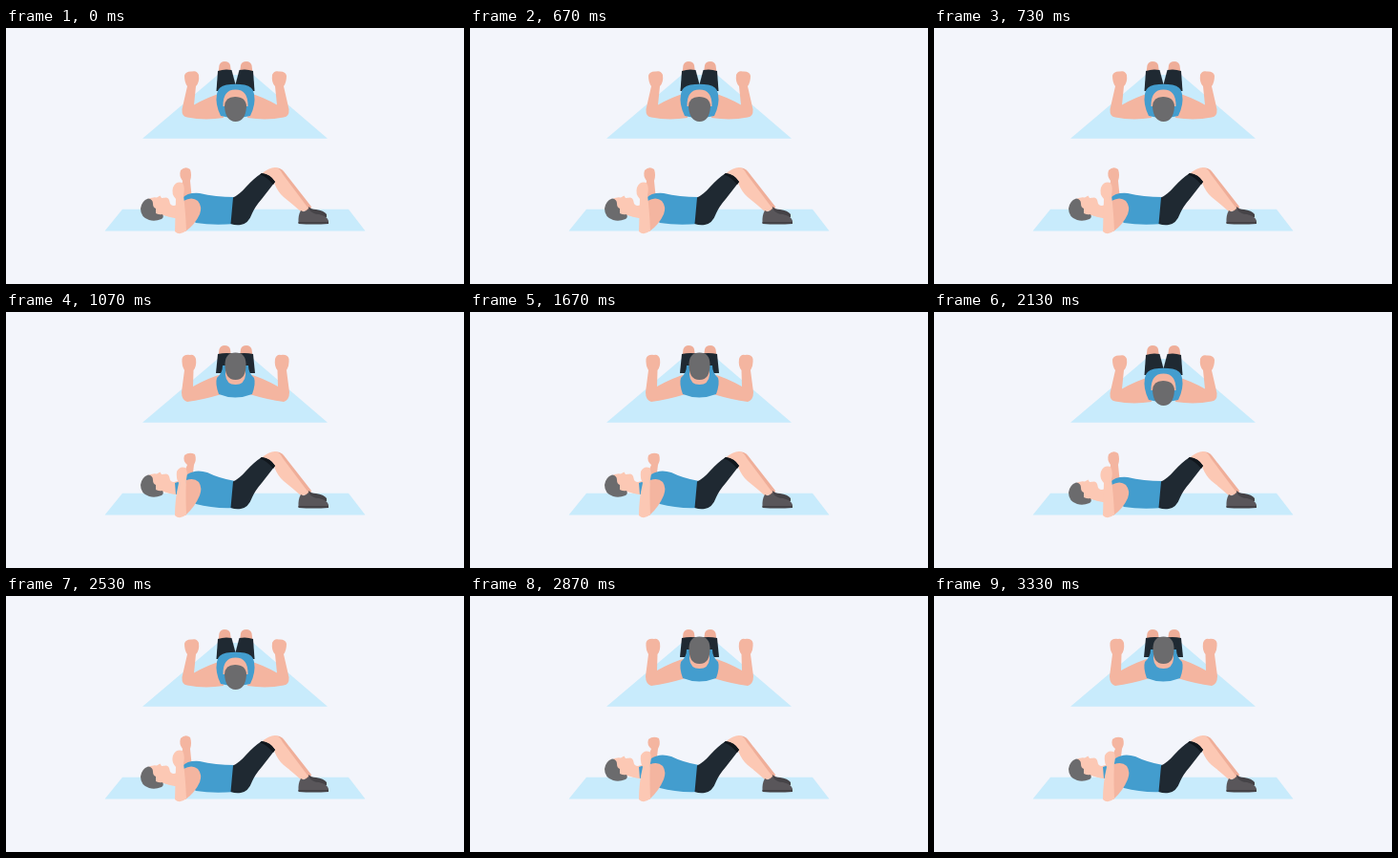
Animation of 480 by 268 pixels, one loop 3.39 s. Source, as an HTML page:

```html
<!DOCTYPE html>
<html lang="en">
<head>
<meta charset="utf-8">
<title>Floor exercise</title>
<style>
  html, body { margin: 0; width: 100%; height: 100%; overflow: hidden; background: #f3f5fb; }
  svg { display: block; width: 100%; height: 100%; }
  .mat { fill: #c8ebfc; }
  .skin { fill: #f4b5a0; }
  .light { fill: #fcc8b4; }
  .shade { fill: #efae99; }
  .top { fill: #439dce; }
  .shorts { fill: #1f2932; }
  .fold { fill: #11171d; }
  .hair { fill: #6b6b6d; }
  .shoe { fill: #59565a; }
  .sole { fill: #454347; }
</style>
</head>
<body>
<svg viewBox="0 0 480 268" preserveAspectRatio="none">
  <path class="mat" d="M143 115.7 L222 49 H259 L337 115.7 Z"/>
  <path class="mat" d="M122 189.7 H359 L376.500 212.500 H103.500 Z"/>

  <!-- knees, seen from the front -->
  <path id="knee" class="shade" d="M222.500 47 L223.500 39 Q225 35 229 35 Q234 35 235 39 L236 47 Z"/>
  <use href="#knee" transform="translate(481) scale(-1 1)"/>

  <!-- lower legs, seen from the side -->
  <path class="shade" d="M276 150 Q285 143 291 150 L320 187 L318 193 L309 190 Z"/>
  <path class="sole" d="M317 187 Q320 190 325 190 Q333 191 336 195 L336 198 H318 Z"/>
  <path class="light" d="M267 153 Q277 145 283 146 Q287 147 290 153 L317 189 L310 193 Q301 185 291 177 Q285 172 281 162 Z"/>
  <path class="shoe" d="M309 191 Q313 194 317 189 Q321 195 328 195 Q337 197 338 202 V204 H306.500 Q306 196 309 191 Z"/>
  <path class="sole" d="M306.500 203 H338 V205 Q322 206 306.500 205 Z"/>

  <g id="head">
    <path class="light" d="M147 180 Q153 176.500 158 177.500 L161.500 175.500 L163 178 L168 177.500 Q171 178 171.500 182 Q172 186 176 186 L187 183 L190 200 Q176 200 165 196 Q154 200 147 190 Z"/>
    <path class="hair" d="M149 178.500 Q154 179 154 184 Q154 188 157 189 V194 Q161 196 164 195 Q166 198 163 200 Q156 203 150 201 Q141 198 141 189 Q142 181 149 178.500 Z"/>
  </g>

  <g id="down">
    <!-- front view -->
    <g id="downHalf">
      <path class="shorts" d="M222 45 Q229 42.500 236.500 44 L240.500 59 V66 H220.500 Z"/>
      <path class="skin" d="M226 68 Q212 72 197 80.500 L199 61 Q203 57 202 49 Q200 44 195 45.500 Q188 45 187 50 Q187 57 190 61 L184.500 85 Q184 93 190 93.500 Q208 97 228 94 Z"/>
    </g>
    <use href="#downHalf" transform="translate(481) scale(-1 1)"/>
    <path class="top" d="M221 69 Q222 61 231 59.500 Q240.500 58 250 59.500 Q259 61 260 69 Q262 80 256 92 Q240 96 225 92 Q219 80 221 69 Z"/>
    <path class="skin" d="M227.500 82 Q227 64.500 240.500 64.500 Q254 64.500 253.500 82 Z"/>
    <path class="hair" d="M229 82 Q229.500 72 240 72 Q251.500 72 252 82 Q251 98 240.500 98 Q230 97.500 229 82 Z"/>

    <!-- side view -->
    <path class="skin" d="M183 184 L185 160 Q181 155 183 149 Q188 144 193 148 Q195 154 193 160 L195 180 Z"/>
    <path class="top" d="M185 178 Q190 172 203 173 Q219 177 240 177 V205 Q217 207 199 204 L187 193 Z"/>
    <path class="skin" d="M186 181 Q195 176 201 181 Q206 187 203 195 Q198 206 188 213 L180 212 Z"/>
    <path class="light" d="M186 175 Q188 190 189 212 Q182 218 177 213 L178 179 Q173 174 175 167 Q178 160 185 162 Q188 167 186 175 Z"/>
  </g>

  <g id="up">
    <!-- front view -->
    <g id="upHalf">
      <path class="shorts" d="M222 44 Q231 42 241 44 V64 H220 Z"/>
      <path class="skin" d="M226 65 Q212 69 196 78 L196.500 61 Q200 57 199 49 Q197 44 193 45 Q186 44 184.500 49 Q184 56 187 61 L184 84 Q184 92 190 94 Q206 92 226 86 Z"/>
    </g>
    <use href="#upHalf" transform="translate(481) scale(-1 1)"/>
    <path class="top" d="M227 56 H254 Q254 64 260 69 Q262 75 258 86 Q240 93 223 86 Q219 75 221 69 Q227 64 227 56 Z"/>
    <path class="skin" d="M230 60 H251 V66 Q250 76 240.500 76 Q231 76 230 66 Z"/>
    <path class="hair" d="M229.500 54 Q230 42.500 240.500 42.500 Q251 42.500 251.500 54 Q252 71 240.500 71 Q229 71 229.500 54 Z"/>

    <!-- side view -->
    <path class="skin" d="M184 174 L190 160 Q185 156 187 150 Q192 146 198 149 Q200 155 197 160 L195 176 Z"/>
    <path class="top" d="M177 179 Q185 177 190 170 Q199 164 211 168 Q223 174 240 177 V205 Q217 206 199 201 L184 190 L178 191 Z"/>
    <path class="skin" d="M189 176 Q197 173 202 178 Q206 184 203 192 Q198 204 188 213 L180 212 Z"/>
    <path class="light" d="M189 175 Q188 190 189 212 Q182 218 177 213 Q177 196 181 179 Q178 174 179 167 Q182 161 188 163 Q191 167 189 175 Z"/>
  </g>

  <!-- shorts, seen from the side -->
  <path class="shorts" d="M238 177.500 Q245 174 251 167 Q260 157 268 152 Q277 153 282 161 L268 179 Q261 187 258 194 Q254 205 246 206 Q241 207 235.500 205 Z"/>
  <path class="fold" d="M268 152 Q277 153 282 161 L280 164 Q274 156 266 153.500 Z"/>
</svg>
<script>
  const LOOP = 3390, HOLD = LOOP / 4;
  const [head, down, up] = ['head', 'down', 'up'].map(id => document.getElementById(id));

  // The two poses swap with a hard cut, each held for a quarter of the loop.
  function draw(t) {
    const raised = Math.floor((t % LOOP) / HOLD) % 2 === 1;
    down.style.display = raised ? 'none' : '';
    up.style.display = raised ? '' : 'none';
    head.setAttribute('transform', `translate(0 ${raised ? -8 : 0})`);
  }

  const start = performance.now();
  function tick() {
    draw(performance.now() - start);
    requestAnimationFrame(tick);
  }
  tick();
</script>
</body>
</html>
```
